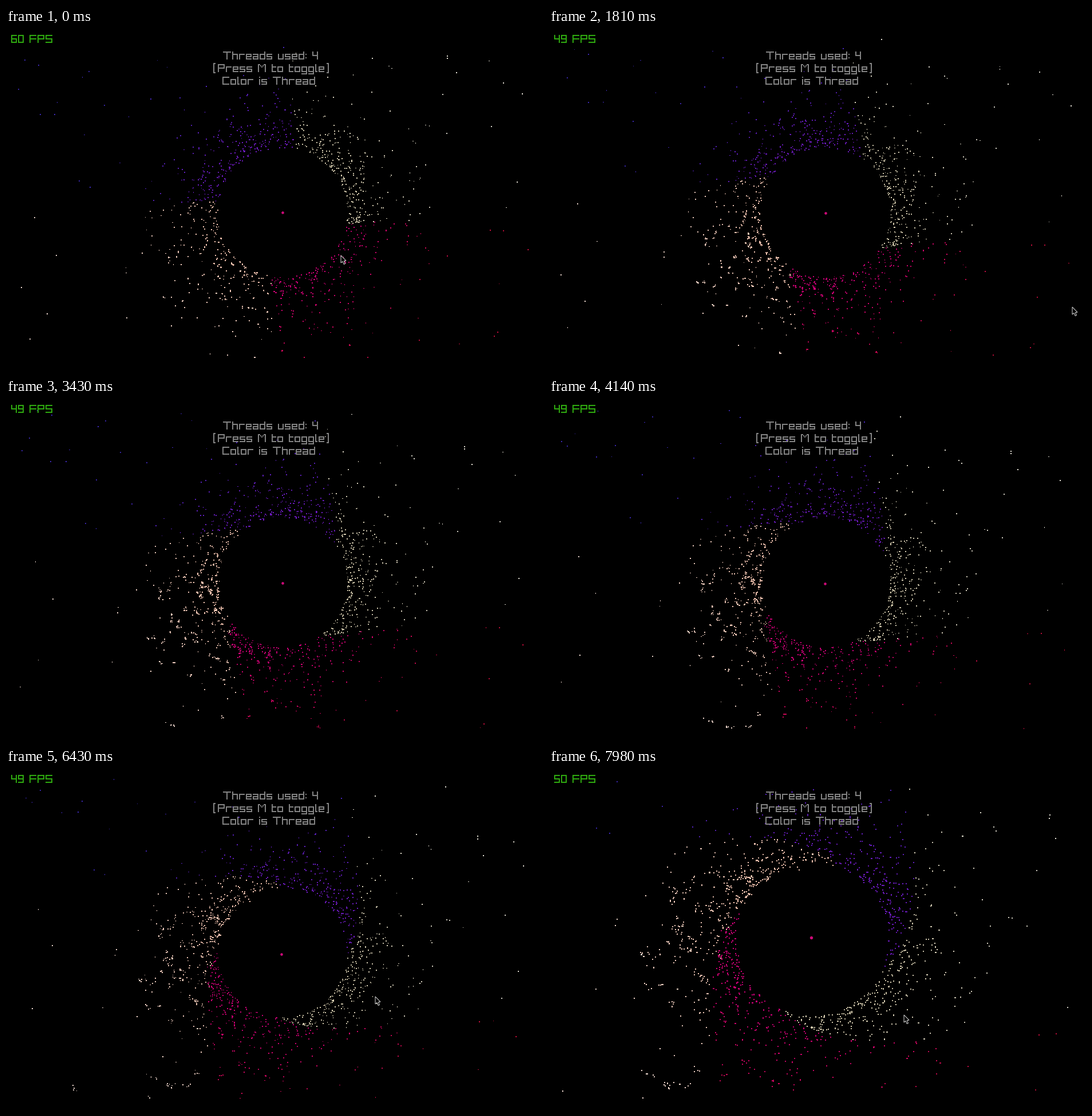
A matplotlib script that plays this animation: 938 by 597 pixels, repeating every 8 s.

```python
import numpy as np
import matplotlib.pyplot as plt
from matplotlib.animation import FuncAnimation
from matplotlib.collections import PolyCollection
from matplotlib.patches import Polygon

W, H, DPI = 938, 597, 100
STEP = 40
FRAMES = 200
PX = 72 / DPI
CX, CY = 483, 322
GM = 75600          # v^2 * r of the circular orbits
AGE = 0.8           # seconds the disc has already turned
HOLE = 113
LEFT, TOP, RIGHT, BOTTOM = 21, 20, 914, 577

rng = np.random.default_rng(11)

fig = plt.figure(figsize=(W / DPI, H / DPI), dpi=DPI, facecolor="black")
ax = fig.add_axes([0, 0, 1, 1])
ax.set_xlim(0, W)
ax.set_ylim(H, 0)
ax.axis("off")

# ---- blocky font: segments of each glyph; lowercase boxes are lower ----
GLYPHS = {
    " ": "", "(": "(", ")": ")", ":": ":",
    "0": "tbLlRr", "4": "LmRr", "5": "tLmrb", "6": "tLlmrb", "9": "tLmRrb",
    "C": "tLlb", "F": "tLlm", "M": "LlRrv", "P": "tLlmR", "S": "tLmrb",
    "T": "tc", "a": "tRrmlb", "d": "tbLlD", "e": "tLlmRb", "g": "tbLlRrg",
    "h": "AtRr", "i": "iLl", "l": "Ab", "o": "tbLlRr", "r": "tLl",
    "s": "tLmrb", "t": "Atb", "u": "LlRrb",
}
WIDTHS = {":": 1, "i": 1, "l": 2, " ": 3, "(": 3, ")": 3, "t": 4,
          "M": 7, "T": 7}


def glyph_width(ch):
    return WIDTHS.get(ch, 6 if ch.isupper() else 5)


def segments(w, top, names):
    """Cell boxes (x0, y0, x1, y1), ends included."""
    e, mid = w - 1, (top + 6) // 2
    c = e // 2
    parts = {
        "t": [(0, top, e, top)], "m": [(0, mid, e, mid)], "b": [(0, 6, e, 6)],
        "L": [(0, top, 0, mid)], "l": [(0, mid, 0, 6)],
        "R": [(e, top, e, mid)], "r": [(e, mid, e, 6)],
        "A": [(0, 0, 0, 6)], "D": [(e, 0, e, 6)], "c": [(c, 0, c, 6)],
        "g": [(e, 6, e, 8), (0, 8, e, 8)], "i": [(0, 0, 0, 0)],
        ":": [(0, y, 0, y) for y in (2, 5)],
        "(": [(0, 0, 0, 6)] + [(0, y, 1, y) for y in (-1, 7)],
        ")": [(e, 0, e, 6)] + [(c, y, e, y) for y in (-1, 7)],
        "v": [(k, 2 - abs(3 - k), k, 2 - abs(3 - k)) for k in range(1, 6)],
    }
    return [box for n in names for box in parts[n]]


def draw_text(text, x, y, color):
    verts = []
    for ch in text:
        w = glyph_width(ch)
        top = 2 if ch.islower() else 0
        for x0, y0, x1, y1 in segments(w, top, GLYPHS[ch]):
            a, b = x + 2 * x0, y + 2 * y0
            c, d = x + 2 * x1 + 2, y + 2 * y1 + 2
            verts.append([(a, b), (c, b), (c, d), (a, d)])
        x += 2 * (w + 1)
    art = PolyCollection(verts, facecolors=color, linewidths=0,
                         antialiaseds=False, zorder=5)
    ax.add_collection(art, autolim=False)
    return art


GRAY, GREEN = "#828282", "#2ea80f"
draw_text("Threads used: 4", 379, 41, GRAY)
draw_text("(Press M to toggle)", 362, 63, GRAY)
draw_text("Color is Thread", 378, 85, GRAY)
draw_text("FPS", 41, 12, GREEN)
counters = {n: draw_text(str(n), 9, 12, GREEN) for n in (60, 50, 49)}


def fps_at(t):
    if t < 0.5:
        return 60
    spans = ((0.5, 1.3), (2.9, 3.3), (4.8, 5.3), (6.0, 6.3), (7.8, 9))
    return 50 if any(a <= t < b for a, b in spans) else 49


# ---- particles: start angle, count, inner colour, outer colour, strays ----
THREADS = [
    (-90, 340, "#ded4b6", "#eeeade",
     [(771, 49), (771, 53), (902, 115), (893, 269), (869, 96)]),
    (0, 290, "#d8007e", "#cd0e3e",
     [(846, 353), (869, 354), (912, 387), (859, 531), (632, 575)]),
    (90, 270, "#ffceba", "#ffe8de",
     [(50, 331), (88, 397), (27, 453), (72, 499), (42, 543)]),
    (180, 340, "#741ccc", "#3e2abe",
     [(33, 56), (57, 65), (60, 151), (85, 151), (128, 267)]),
]


def hex_rgb(code):
    return np.array([int(code[k:k + 2], 16) for k in (1, 3, 5)]) / 255


def spin(r):
    return np.sqrt(GM / r ** 3)


def on_stage(x, y):
    return (x > LEFT) & (x < RIGHT) & (y > TOP) & (y < BOTTOM)


def make_thread(start, count, inner, outer, strays):
    scale = np.where(rng.random(count) < 0.65, 40, 130)
    r = HOLE + rng.exponential(scale)
    a = np.radians(start + 90 * rng.random(count))
    if start == -90:    # dense knot at the leading edge
        r = np.append(r, rng.normal(131, 5, 22))
        a = np.append(a, np.radians(rng.uniform(-6, 0, 22)))
    a = a + spin(r) * AGE
    hidden = ~on_stage(CX + r * np.cos(a), CY + r * np.sin(a))
    keep = (r < 265) | hidden | (rng.random(r.size) < 0.55)
    dx, dy = (np.array(strays) - (CX, CY)).T
    r = np.append(r[keep], np.hypot(dx, dy))
    a = np.append(a[keep], np.arctan2(dy, dx))

    # some dots hold several bodies that drift apart
    deg = np.degrees(a - spin(r) * AGE) % 360
    chance = np.where((deg > 90) & (deg < 155), 0.42, 0)
    chance = np.where((deg > 55) & (deg <= 90), 0.25, chance)
    extra = np.where(rng.random(r.size) < chance, 3, 0)
    still = np.zeros((r.size, 2))
    drift = rng.normal(0, 0.5, (extra.sum(), 2))
    r = np.append(r, np.repeat(r, extra))
    a = np.append(a, np.repeat(a, extra))

    mix = np.clip((r - 130) / 200, 0, 1)[:, None]
    rgb = hex_rgb(inner) * (1 - mix) + hex_rgb(outer) * mix
    rgb *= rng.uniform(0.85, 1, (r.size, 1))
    return r, a, np.vstack([still, drift]), rgb


radius, angle, drift, colors = (np.concatenate(p) for p in
                                zip(*(make_thread(*th) for th in THREADS)))
omega = spin(radius)

dots = ax.scatter([], [], marker="s", linewidths=0, antialiased=False, zorder=2)
core = ax.scatter([CX], [CY], marker="o", color="#cc0a78", linewidths=0,
                  antialiased=False, zorder=3)

ARROW = np.array([(0, 0), (0, 13), (3, 10.5), (5.2, 15.5), (7.4, 14.5),
                  (5.4, 9.6), (9, 9.2)])
cursor = Polygon(ARROW, closed=True, facecolor="black", edgecolor="#d8d8d8",
                 linewidth=PX, zorder=6)
ax.add_patch(cursor)


def zoom_at(t):
    u = np.clip((t - 7.0) / 0.5, 0, 1)
    return 1 + 0.18 * u * u * (3 - 2 * u)


def core_at(t):
    return (CX + np.interp(t, [2.7, 6.4, 8], [0, -2.4, -1.8]),
            CY + np.interp(t, [0, 2.7, 6.4, 8], [0, 1, 3.4, -2.4]))


def mouse_at(t):
    if t < 4:
        return (np.interp(t, [1.4, 1.8], [585, 914]),
                np.interp(t, [1.4, 1.8], [397, 487]))
    times = [6.2, 6.4, 6.6, 7.0]
    return (np.interp(t, times, [880, 645, 645, 620]),
            np.interp(t, times, [340, 399, 399, 431]))


def update(i):
    t = i * STEP / 1000
    z = zoom_at(t)

    def view(x, y):
        return 611 + z * (x - 611), 450 + z * (y - 450)

    a = angle + omega * t
    off = drift * (t + AGE)
    x, y = view(CX + radius * np.cos(a) + off[:, 0],
                CY + radius * np.sin(a) + off[:, 1])
    seen = on_stage(x, y)
    dots.set_offsets(np.column_stack([x, y])[seen])
    dots.set_facecolors(colors[seen])
    dots.set_sizes([(1.75 * z * PX) ** 2])

    core.set_offsets([view(*core_at(t))])
    core.set_sizes([(4.6 * z * PX) ** 2])

    cursor.set_xy(ARROW + mouse_at(t))
    cursor.set_visible(t < 1.85 or t > 6.22)

    for n, art in counters.items():
        art.set_visible(n == fps_at(t))
    return dots, core, cursor, *counters.values()


anim = FuncAnimation(fig, update, frames=FRAMES, interval=STEP, repeat=True,
                     repeat_delay=0, blit=False)
plt.show()
```
